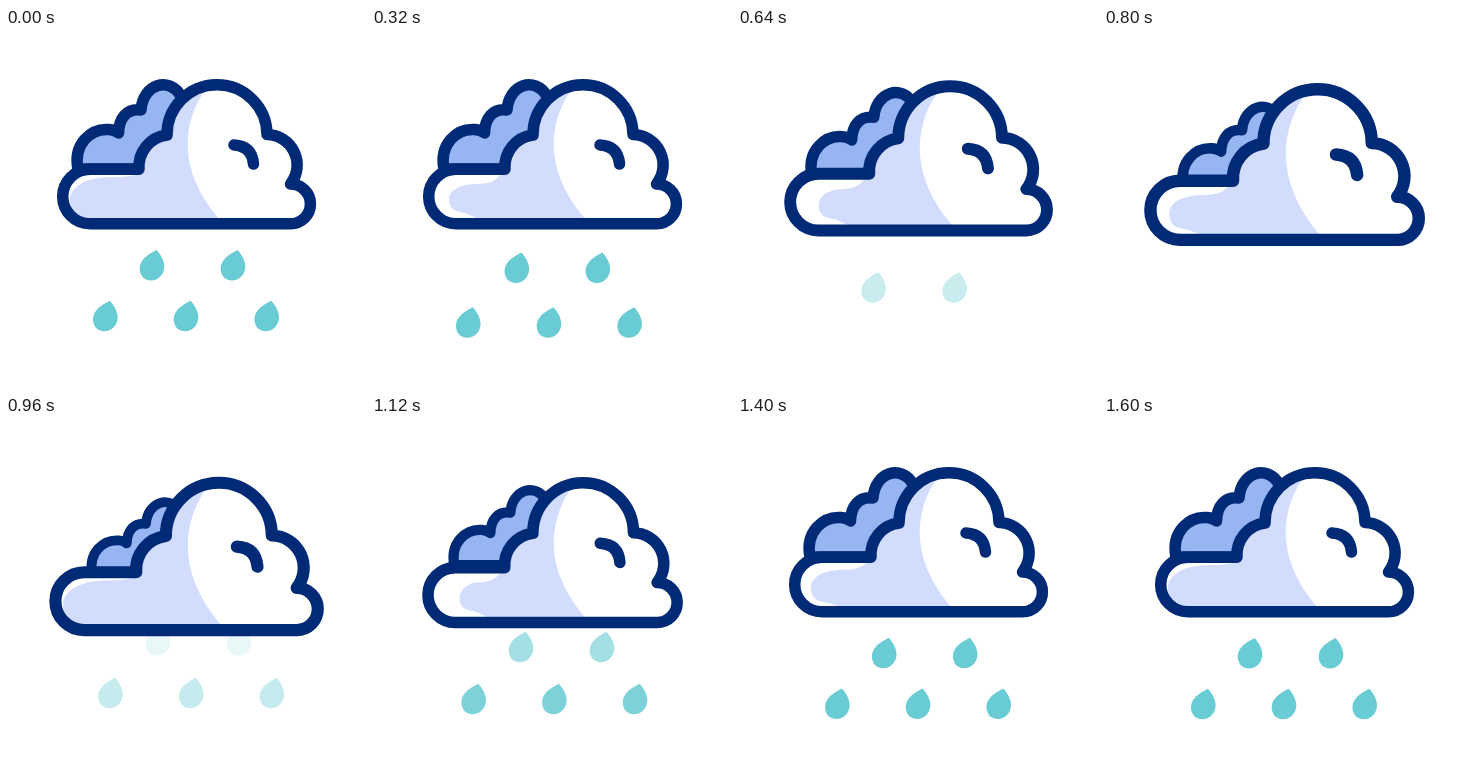
Animation of 360 by 360 pixels, one loop 1.64 s. Source, as an HTML page:

```html
<!DOCTYPE html>
<html>
<head>
<meta charset="utf-8">
<style>
  html, body { margin: 0; height: 100%; overflow: hidden; background: #fff; }
  svg { display: block; width: 100vw; height: 100vh; }
  .line { stroke: #012a76; stroke-width: 11.5; stroke-linecap: round; stroke-linejoin: round; }
</style>
</head>
<body>
<svg viewBox="0 0 360 360">
  <defs>
    <path id="drop" fill="#69cbd3" d="M4.5-15.5C8-12 12.3-5 12.3 1C12.3 9 6 15-1 15C-8 15-12.3 10-12.3 3C-12.3-6-4-11 4.5-15.5Z"/>
    <path id="outline" d="M84 195.8A27.3 27.3 0 0 1 84 141.2H133A32 32 0 0 1 161 107A50 50 0 0 1 261 106.5A30.5 30.5 0 0 1 284.5 156A19.7 19.7 0 0 1 284.5 195.8Z"/>
    <clipPath id="inside"><use href="#outline"/></clipPath>
  </defs>
  <g id="upper"><use href="#drop" x="146" y="237.6"/><use href="#drop" x="227" y="237.6"/></g>
  <g id="lower"><use href="#drop" x="99.3" y="288.2"/><use href="#drop" x="180" y="288.2"/><use href="#drop" x="260.7" y="288.2"/></g>
  <path id="back" class="line" fill="#97b4f3" d="M72 141C67 116 85 100 103 101.5Q109 102 112.5 105C113 90 121 80 135 82C137 56 163 48 175 68L180 110L135 141Z"/>
  <g id="front">
    <g clip-path="url(#inside)">
      <path fill="#d2dcfd" d="M40 40H320V210H40Z"/>
      <path fill="#fff" d="M202 58C174 95 172 145 215 193V210H320V40H202Z"/>
      <path id="shine" fill="#fff"/>
    </g>
    <use href="#outline" class="line" fill="none"/>
    <path class="line" fill="none" d="M228 117Q246 118 247.5 136"/>
  </g>
</svg>
<script>
const LOOP = 1640, STEP = 40;
const $ = id => document.getElementById(id);
const ramp = (t, a, b) => Math.min(1, Math.max(0, (t - a) / (b - a)));
const smooth = (t, a, b) => Math.sin(ramp(t, a, b) * Math.PI / 2) ** 2;
const bump = (t, a, peak, b) => t < peak ? smooth(t, a, peak) : 1 - smooth(t, peak, b);

// Width of the white shine on the cloud's left side over time
const shineKeys = [[0, 0], [320, 1], [640, 1.55], [960, 0], [1120, 1.85], [1280, 1], [1600, 0], [LOOP, 0]];

function shineAt(t) {
  const i = shineKeys.findIndex(k => k[0] > t);
  const [[t0, a], [t1, b]] = [shineKeys[i - 1], shineKeys[i]];
  return a + (b - a) * smooth(t, t0, t1);
}

function shinePath(p) {
  const q = Math.min(p, 1), x = 64 + 13 * p, top = 149 + 7 * q, low = 190 - 5 * q;
  return `M40 130H132L128 147Q122 ${top} 106 ${top}C${x + 8} ${top} ${x} 164 ${x} 171` +
    `C${x} ${low - 4} ${x + 6} ${low - 1} ${x + 16} ${low}L${x + 27} 190V210H40Z`;
}

// Rain accelerates out, then a new row slides in and settles
function moveRow(id, t, out, enter) {
  const leaving = t < 800;
  const d = leaving
    ? out.pull * Math.max(0, t - out.start) ** 2
    : -enter.pull * Math.max(0, enter.stop - t) ** 2;
  const alpha = leaving ? 1 - ramp(t, ...out.fade) : ramp(t, ...enter.fade);
  $(id).setAttribute('transform', `translate(${-d * 0.47} ${d})`);
  $(id).setAttribute('opacity', alpha);
}

function draw(t) {
  const sink = bump(t, 440, 1000, 1340);
  const hide = bump(t, 470, 970, 1310);
  const grow = 1 + 0.085 * Math.sin(ramp(t, 480, 1180) * Math.PI) ** 2;
  const shrink = grow * (1 - 0.195 * hide);
  $('front').setAttribute('transform',
    `translate(180 ${126 + 14.3 * sink}) scale(${grow}) translate(-180 -126)`);
  $('back').setAttribute('transform',
    `translate(${155 + 2 * hide} ${51 + 30.4 * hide}) scale(${shrink}) translate(-155 -51)`);
  $('shine').setAttribute('d', shinePath(shineAt(t)));
  moveRow('upper', t, { start: 158, pull: 9.5e-5, fade: [520, 705] },
    { stop: 1500, pull: 4.4e-5, fade: [907, 1262] });
  moveRow('lower', t, { start: 22, pull: 7.3e-5, fade: [400, 630] },
    { stop: 1450, pull: 4.6e-5, fade: [835, 1165] });
}

const begin = performance.now();
function tick() {
  const t = (performance.now() - begin) % LOOP;
  draw(Math.floor(t / STEP) * STEP);
  requestAnimationFrame(tick);
}
tick();
</script>
</body>
</html>
```
